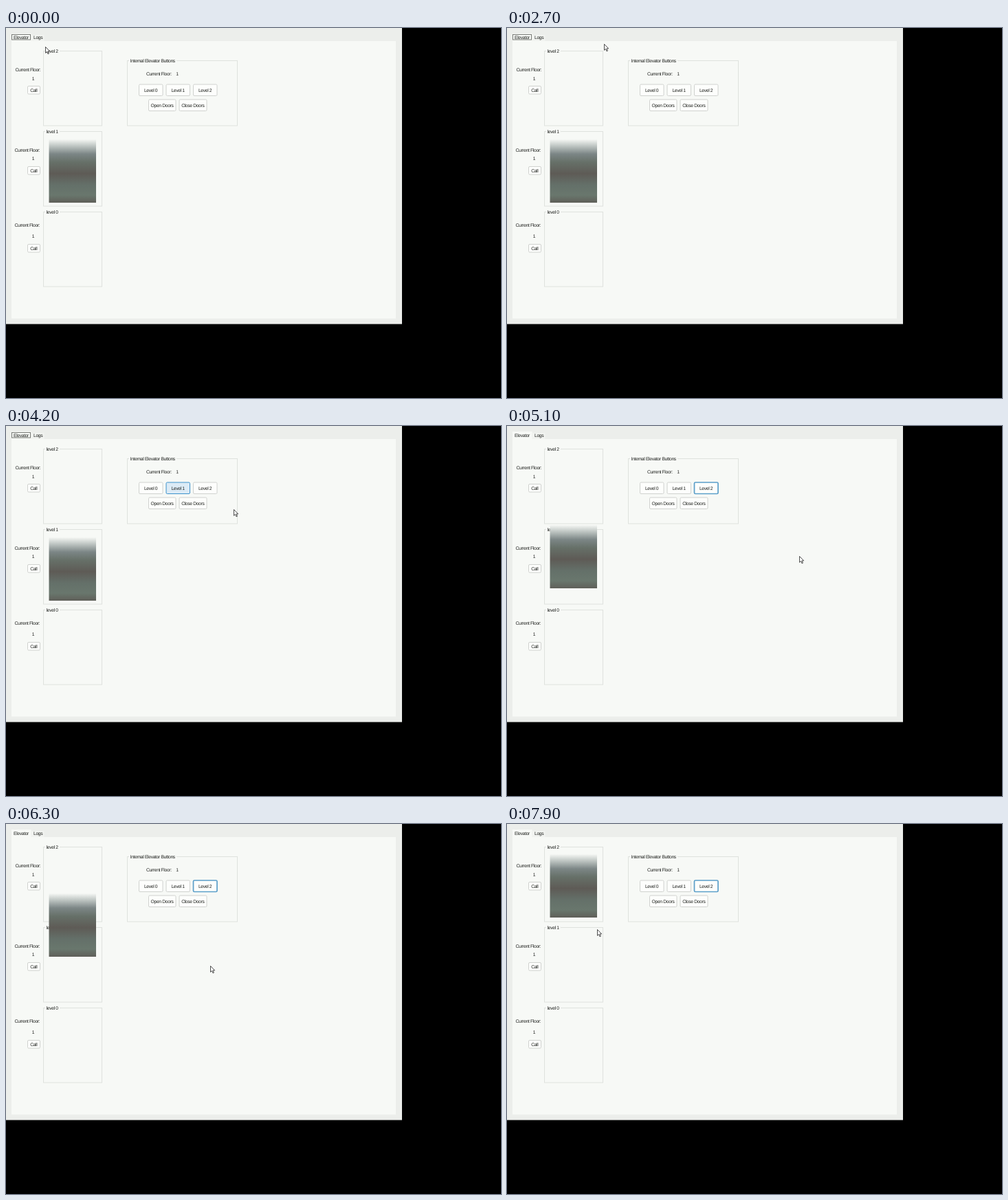
An HTML page that plays this animation: 720x538 px, repeating every 8 s.

```html
<!DOCTYPE html>
<html lang="en">
<head>
<meta charset="utf-8">
<title>Elevator</title>
<style>
html, body { margin: 0; width: 100%; height: 100%; overflow: hidden; background: #000; }
svg { display: block; }
text {
  font: 6.8px "Liberation Sans", Arial, sans-serif;
  letter-spacing: -.37px;
  fill: #20221f;
  text-rendering: geometricPrecision;
  white-space: pre;
}
.page { fill: #f7f9f6; }
.group { fill: none; stroke: #dfe2de; }
.button { fill: #fdfefc; stroke: #d0d2cf; }
.hover { fill: #dcebf6; stroke: #3d92cc; }
.focus { stroke: #5b9fc9; stroke-width: 1.7; }
</style>
</head>
<body>
<svg width="720" height="538" viewBox="0 0 720 538">
  <defs>
    <linearGradient id="steel" x2="0" y2="1">
      <stop offset="0" stop-color="#f5f7f4"/>
      <stop offset=".1" stop-color="#c0c7c4"/>
      <stop offset=".23" stop-color="#7c8686"/>
      <stop offset=".36" stop-color="#667068"/>
      <stop offset=".54" stop-color="#5e5b56"/>
      <stop offset=".72" stop-color="#647069"/>
      <stop offset=".88" stop-color="#69776d"/>
      <stop offset="1" stop-color="#5f5f59"/>
    </linearGradient>
  </defs>
  <rect width="576" height="430.5" fill="#eceeeb"/>
  <rect class="page" x="8" y="19" width="559" height="403.5"/>
  <rect class="page" x="8" y="8" width="28.5" height="12"/>
  <rect x="37" y="10" width="18.5" height="9" fill="#f1f3f0"/>
  <rect id="tabFocus" x="8.5" y="9.5" width="27" height="7.5" fill="none" stroke="#777975"/>
  <g id="ui"></g>
  <rect id="car" x="62.5" width="68.5" height="92" fill="url(#steel)"/>
  <path id="cursor" d="M.5 .5V9.3L2.6 7.4L4 10.8L5.4 10.2L4 6.9H6.7Z"
        fill="#fff" stroke="#222" stroke-width=".8"/>
</svg>
<script>
const $ = id => document.getElementById(id);
const ui = $("ui");

function add(tag, attrs, content = "") {
  const el = document.createElementNS("http://www.w3.org/2000/svg", tag);
  for (const name in attrs) el.setAttribute(name, attrs[name]);
  el.textContent = content;
  return ui.appendChild(el);
}

// y is the vertical middle of the line
const label = (str, x, y, anchor = "start") =>
  add("text", { x, y: y + 2.5, "text-anchor": anchor }, str);

function group(title, x, y, width, height, gap) {
  add("rect", { class: "group", x: x + .5, y: y + .5, width, height });
  add("rect", { class: "page", x: x + 3, y: y - 2, width: gap, height: 5 });
  label(title, x + 4.7, y + .3);
}

function button(title, x, y, width, height) {
  const box = add("rect", { class: "button", x: x + .5, y: y + .5, width, height, rx: 1.5 });
  label(title, x + width / 2 + .3, y + height / 2 + .4, "middle");
  return box;
}

// group top, caption, number and button positions of each floor
[[2, 33, 60.5, 73, 84], [1, 150, 177, 189, 201], [0, 267, 286, 302.5, 314]]
  .forEach(([level, top, caption, number, call]) => {
    group("level " + level, 54, top, 85, 108.5, 21);
    label("Current Floor:", level == 2 ? 13.5 : 12.5, caption);
    label("1", 37.8, number);
    button("Call", 31, call, 18, 11.5);
  });

group("Internal Elevator Buttons", 176, 47, 160, 94.5, 69);
label("Current Floor:", 204, 66);
label("1", 247.3, 66);
const levels = [193, 232.5, 272].map((x, i) => button("Level " + i, x, 81.5, 34.5, 16.5));
button("Open Doors", 207, 103.5, 39.5, 16.5);
button("Close Doors", 251.5, 103.5, 40, 16.5);
label("Elevator", 11, 13);
label("Logs", 40, 13.5);

// time, x, y
const path = [
  [0, 57, 27], [1300, 57, 27], [2700, 141, 23], [3500, 250, 90], [3900, 252, 91],
  [4200, 331, 121], [4450, 290, 91], [4600, 291, 92], [4800, 350, 135], [5100, 425, 189],
  [5400, 424, 196], [6300, 297, 206], [7200, 171, 193], [7900, 131, 153], [8000, 131, 153]
];

function cursorAt(t) {
  const i = path.findIndex(p => p[0] > t);
  const [t0, x0, y0] = path[i - 1], [t1, x1, y1] = path[i];
  const k = (t - t0) / (t1 - t0);
  return [x0 + (x1 - x0) * k, y0 + (y1 - y0) * k];
}

const START = 4600, TRAVEL = 3300;

function draw(now) {
  const t = Math.floor(now % 8000 / 100) * 100;
  const rise = Math.min(1, Math.max(0, (t - START) / TRAVEL));
  $("car").setAttribute("y", Math.round(162 - 118 * rise));
  $("cursor").setAttribute("transform", `translate(${cursorAt(t).map(Math.round)})`);
  const pressed = t >= START - 100;
  $("tabFocus").style.display = pressed ? "none" : "";
  levels[1].classList.toggle("hover", t >= 3400 && t < 4300);
  levels[2].classList.toggle("hover", t >= 4300 && t < 4700);
  levels[2].classList.toggle("focus", pressed);
  requestAnimationFrame(draw);
}
requestAnimationFrame(draw);
</script>
</body>
</html>
```
